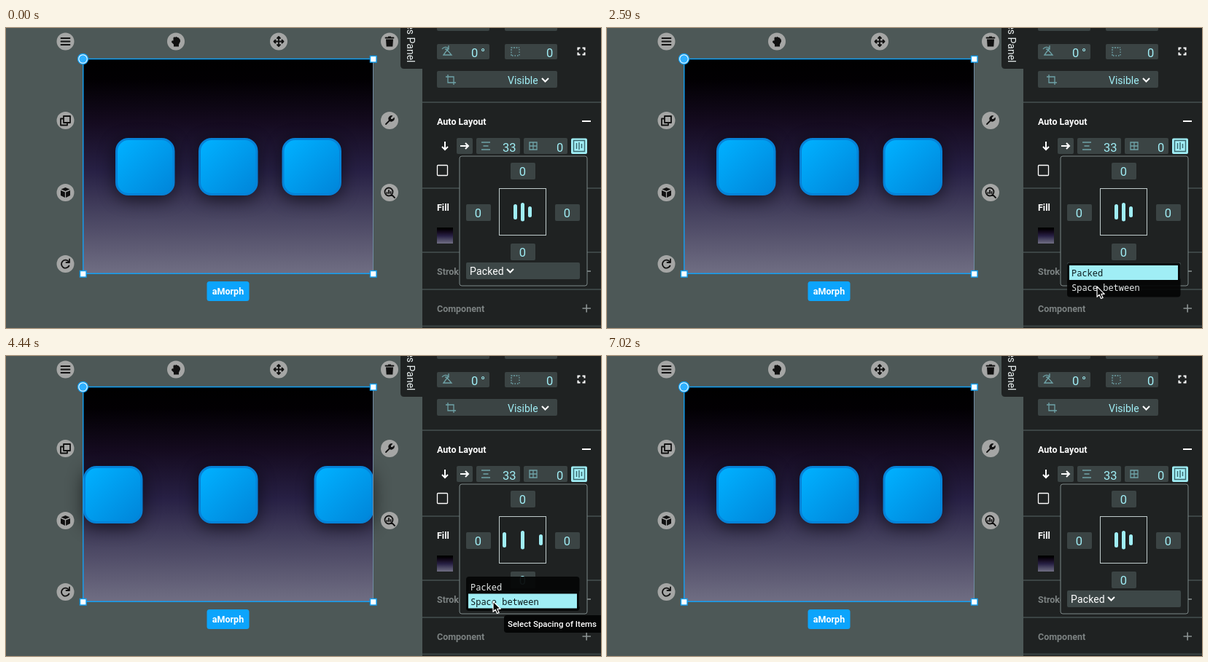
An HTML page that plays this animation: 816x412 px, repeating every 8.15 s.

```html
<!DOCTYPE html>
<html lang="en">
<head>
<meta charset="utf-8">
<title>Auto layout spacing</title>
<style>
  html, body { margin: 0; width: 100%; height: 100%; overflow: hidden; background: #4d5857; }
  svg { display: block; width: 100vw; height: 100vh; font: 14px Roboto, sans-serif; }
  .head { font-size: 12.5px; font-weight: 700; fill: #fff; }
  .dim { fill: #7c8282; }
  .num { font-size: 16.5px; fill: #a0eef5; }
  .mono { font: 12px "Noto Sans Mono", monospace; }
  .line { fill: none; stroke: #fff; stroke-width: 2; }
  .cyan { fill: none; stroke: #6fa3a8; stroke-width: 1.3; }
  .ink { fill: none; stroke: #111; stroke-width: 1.8; stroke-linejoin: round; stroke-linecap: round; }
</style>
</head>
<body>
<svg viewBox="0 0 816 412" preserveAspectRatio="none">
  <defs>
    <linearGradient id="night" x2="0" y2="1">
      <stop offset="0" stop-color="#000"/>
      <stop offset=".1" stop-color="#020003"/>
      <stop offset=".3" stop-color="#150b20"/>
      <stop offset=".52" stop-color="#272044"/>
      <stop offset=".72" stop-color="#46425f"/>
      <stop offset="1" stop-color="#706e83"/>
    </linearGradient>
    <linearGradient id="sky" x2="1" y2="1">
      <stop offset=".05" stop-color="#00b0ff"/>
      <stop offset="1" stop-color="#0084d8"/>
    </linearGradient>
    <filter id="blur" x="-60%" y="-60%" width="220%" height="220%">
      <feGaussianBlur stdDeviation="12"/>
    </filter>
    <g id="tile">
      <rect y="5" width="81" height="79" rx="18" opacity=".6" filter="url(#blur)"/>
      <rect x="1.5" y="1.5" width="78.5" height="76" rx="16.5" fill="url(#sky)" stroke="#0683d8" stroke-width="3"/>
    </g>
    <path id="chevron" class="line" d="M-4.500-2.500L0 2L4.500-2.500" stroke-width="2.4"/>
  </defs>

  <rect width="816" height="412" fill="#4d5857"/>
  <rect x="106" y="43" width="398" height="294" fill="url(#night)"/>
  <use href="#tile" class="tile" y="151"/>
  <use href="#tile" class="tile" y="151"/>
  <use href="#tile" class="tile" y="151"/>
  <path d="M503.500 43V337" stroke="#6f8ca3"/>
  <path d="M503.500 42.500H105.800V337.300H503.500" fill="none" stroke="#12a0f4" stroke-width="1.4"/>
  <g id="handles" fill="#fff" stroke="#12a0f4" stroke-width="1.4">
    <circle cx="105.500" cy="42.500" r="7"/>
    <circle cx="105.500" cy="42.500" r="5.200" fill="#2fb0ff" stroke="none"/>
  </g>
  <rect x="275.500" y="348" width="58" height="27" rx="3.500" fill="#0ca4fc"/>
  <text x="304.500" y="366" text-anchor="middle" class="head">aMorph</text>
  <g id="tools"></g>

  <path d="M541 0H572V56H546Q541 56 541 51Z" fill="#1f2222"/>
  <text transform="translate(550 47.500) rotate(90)" text-anchor="end" fill="#e8eeee">es Panel</text>
  <rect x="571" width="245" height="412" fill="#1f2222"/>
  <path d="M571 102H816M571 220H816M571 308H816M571 359H816M571 409.500H816" stroke="#3b4444" stroke-width="2"/>
  <g id="fields"></g>

  <text x="638" y="40" class="num">0</text><text x="651" y="40" class="num">°</text>
  <text x="741" y="40" class="num">0</text>
  <path class="cyan" d="M598 29A6 6 0 0 1 607 28M607 24V29H602M600 37L605 30L611 37Z"/>
  <path class="cyan" d="M693 38V27H704" stroke-dasharray="2 1.500"/>
  <path class="cyan" d="M704 29V38H694" stroke-dasharray="1.500 2"/>
  <path class="line" d="M784.500 30.500V27.500H787.500M790.500 27.500H793.500V30.500M793.500 33.500V36.500H790.500M787.500 36.500H784.500V33.500"/>
  <path class="cyan" d="M606 64V75H617M603 67H614V78" stroke-width="1.500"/>
  <text x="688" y="76.500" fill="#a0eef5">Visible</text>
  <use href="#chevron" x="739.500" y="71.500" style="--c:1"/>
  <text x="591" y="133" class="head">Auto Layout</text>
  <path class="line" d="M790 128H802"/>
  <path class="line" stroke-width="1.600" d="M602 156V167M598 163L602 167L606 163M623 162H634M630 158L634 162L630 166"/>
  <path class="cyan" d="M652 157H664M654.500 162H661.500M652 167H664M718 157H728V167H718ZM723 157V167M718 162H728"/>
  <text x="681" y="169.500" class="num">33</text><text x="755" y="169.500" class="num">0</text>
  <rect x="775" y="151.500" width="22" height="21.500" rx="2" fill="#a0eef5"/>
  <path d="M778.500 154.500H793.500V169.500H778.500ZM782.500 158V166M786 157V167M789.500 159V165" fill="none" stroke="#39666b" stroke-width="1.400"/>
  <rect x="591.500" y="188.500" width="14" height="14" rx="1" class="line" style="stroke-width:1.300"/>
  <text x="591" y="251" class="head">Fill</text>
  <rect x="591" y="274" width="22" height="22" fill="url(#night)"/>
  <text x="591" y="339" class="head dim">Stroke</text>
  <text x="591" y="390" class="head dim">Component</text>
  <path d="M790.500 334H802M790.500 385H802M796.200 379.500V390.500" stroke="#8b9292" stroke-width="1.600"/>

  <rect x="622" y="176" width="175" height="178" rx="3" fill="#1f2222" stroke="#7d8888"/>
  <g id="paddings"></g>
  <rect x="676.500" y="220.500" width="64" height="64" fill="none" stroke="#c0cccc"/>
  <rect class="bar" y="242" width="5" height="21" rx="2.500" fill="#a0eef5"/>
  <rect class="bar" y="240" width="5" height="25.500" rx="2.500" fill="#a0eef5"/>
  <rect class="bar" y="245" width="5" height="15" rx="2.500" fill="#a0eef5"/>
  <rect x="631" y="322" width="156" height="23" rx="2" fill="#3d4747"/>
  <text id="choice" x="636" y="338.500" fill="#fff" letter-spacing=".15"></text>
  <use id="caret" href="#chevron" y="333.500"/>

  <g id="list">
    <rect x="631" width="155.500" height="47" rx="4" fill="#050606" fill-opacity=".93"/>
    <rect id="mark" x="634" width="149" height="20" fill="#a0eef5"/>
    <text class="mono row" x="637" y="18.500">Packed</text>
    <text class="mono row" x="637" y="38.500">Space between</text>
  </g>
  <g id="tip">
    <rect x="683" y="356" width="140" height="24" rx="4" fill="#050606"/>
    <text x="688" y="372" fill="#fff" font-size="11.500" font-weight="500">Select Spacing of Items</text>
  </g>

  <g id="cursor" stroke-linejoin="round" stroke-linecap="round">
    <path id="arrow" d="M0 0V14.300L3.200 11.300L5.500 16.500L8.100 15.400L5.800 10.300H10.300Z" fill="#0a0a0a" stroke="#fff" stroke-width="1.200"/>
    <g id="hand" fill="#fff" stroke="#111">
      <path d="M-1.800 9V1.800Q-1.500 0 0 0Q1.300 0 1.500 1.800V5.500Q3.500 4.600 4.200 6.300Q6 5.800 6.400 7.300Q8.300 7 8.300 9Q8.300 12 6.500 14V16H-1.500V14.500L-5.500 9.500Q-6.200 7.500-4.300 7.700Z"/>
      <path d="M1.500 11V13.500M3.500 11V13.500M5.500 11V13.500" fill="none" stroke-width=".8"/>
    </g>
    <g id="grab" fill="#fff" stroke="#111">
      <path d="M-4.500 4.500L-6.300-1.500Q-6.300-3.500-4.300-3L-3-1V-4Q-2.500-6-1-4.500V-5Q.2-7 1.500-5V-4Q3.300-5.500 4.200-3.300V0Q5.800-2 6.700 0Q6.500 4 4.800 6V9H-3.500V7L-8 3Q-8 .8-6 1.500Z"/>
      <path d="M-1 0V-3.500M1.500 0V-3.500M4.200 1V-1" fill="none" stroke-width=".7"/>
    </g>
  </g>
</svg>
<script>
const LOOP = 8150;
const $ = id => document.getElementById(id);
const all = sel => [...document.querySelectorAll(sel)];
const box = (x, y, w, h) => `<rect x="${x}" y="${y}" width="${w}" height="${h}" rx="2" fill="#3b4444"/>`;
const show = (el, on) => el.setAttribute('visibility', on ? 'inherit' : 'hidden');
const place = (els, xs) => els.forEach((el, i) => el.setAttribute('x', xs[i]));

$('fields').innerHTML = [
  [591, -18, 72, 22], [684, -18, 72, 22], [591, 22, 72, 21], [684, 22, 72, 21],
  [591, 59, 165, 23], [618, 151, 22, 22], [645, 151, 60, 22], [710, 151, 60, 22]
].map(b => box(...b)).join('');

$('paddings').innerHTML = [[692, 185], [631, 242], [753, 242], [692, 296]].map(([x, y]) =>
  box(x, y, 34, 23) + `<text class="num" x="${x + 16.5}" y="${y + 18}" text-anchor="middle">0</text>`).join('');

$('handles').innerHTML += [[499.5, 38.5], [101.5, 333.5], [499.5, 333.5]].map(([x, y]) =>
  `<rect x="${x}" y="${y}" width="8.500" height="8.500"/>`).join('');

// Round tool buttons: centre, line icon, solid icon
const tools = [
  [81.5, 18.5, 'M-6-4.500H6M-6 0H6M-6 4.500H6', ''],
  [233, 18.5, '', 'M-3.500-5Q-2-7-1-5.500Q.500-7.500 2-5.500Q4-6 4.500-4Q6-3.500 6 0L4 4V7H-3V4L-6 1Q-6-2-3.500-1Z'],
  [374, 18.5, 'M-6 0H6M0-6V6M-4.500-2L-6.500 0L-4.500 2M4.500-2L6.500 0L4.500 2M-2-4.500L0-6.500L2-4.500M-2 4.500L0 6.500L2 4.500', ''],
  [526, 18.5, 'M-5.500-5H5.500', 'M-2-7H2V-5H-2ZM-5-3H5L4.300 7H-4.300Z'],
  [81.5, 127, 'M-2.500-6H6.500V3H-2.500ZM-2.500-2.500H-6.500V6.500H2.500V3', ''],
  [526, 127, 'M-5 5L1-1', 'M-1 0A4.500 4.500 0 0 1 4.500-6.500L2-4V-2H4L6.500-4.500A4.500 4.500 0 0 1 0 1Z'],
  [81.5, 226, '', 'M0-7L6-4.500L0-2L-6-4.500ZM-6.500-3L-.600-.500V7L-6.500 4ZM6.500-3L.600-.500V7L6.500 4Z'],
  [526, 226, 'M-6.500-1A5.500 5.500 0 1 1 4.500-1A5.500 5.500 0 1 1-6.500-1M3 3L7 7M-3.500 0V1M-1-3V1M1.500-1V1', ''],
  [81.5, 324, 'M5 2.500A5.500 5.500 0 1 1 4.500-3M5.500-6.500V-2H1', '']
];
$('tools').innerHTML = tools.map(([x, y, line, solid]) =>
  `<g transform="translate(${x} ${y})"><circle r="12" fill="#a5a6a5"/><path class="ink" d="${line}"/><path fill="#111" d="${solid}"/></g>`).join('');
document.querySelector('[style="--c:1"]').setAttribute('filter', '');

// Pointer moves: start, end, steps, target x, target y, shape
const moves = [
  [590, 940, 7, 675, 345, 'arrow'],
  [1000, 1120, 3, 676, 339, 'arrow'],
  [1300, 1360, 2, 676, 336, 'arrow'],
  [1720, 1720, 1, 678, 336, 'hand'],
  [2130, 2130, 1, 677, 336, 'arrow'],
  [2420, 2590, 4, 672, 355, 'arrow'],
  [3420, 3600, 4, 669, 338, 'arrow'],
  [3780, 3780, 1, 669, 339, 'hand'],
  [4320, 4320, 1, 668, 337, 'arrow'],
  [4790, 5070, 6, 652, 318, 'arrow'],
  [5310, 5310, 1, 652, 319, 'grab'],
  [5660, 5900, 5, 651, 341, 'hand'],
  [6610, 7020, 7, 668, 415, 'arrow']
];

function pointerAt(t) {
  let x = 683, y = 412, shape = 'arrow';
  for (const [start, end, steps, tx, ty, kind] of moves) {
    if (t < start) break;
    const pace = (end - start) / (steps - 1) || 1;
    const k = Math.min(1, (1 + Math.floor((t - start) / pace + 1e-6)) / steps);
    x += (tx - x) * k;
    y += (ty - y) * k;
    shape = kind;
  }
  return { x, y, shape };
}

const tiles = all('.tile'), bars = all('.bar'), rows = all('.row');

function draw(t) {
  const within = (a, b) => t >= a && t < b;
  const spread = within(3000, 5310);
  place(tiles, spread ? [106, 264, 422.5] : [150, 264, 378.5]);
  place(bars, spread ? [681, 706, 731] : [696, 706, 716]);
  $('choice').textContent = spread ? 'Space between' : 'Packed';
  $('caret').setAttribute('x', spread ? 742.5 : 691.5);

  show($('list'), within(2010, 3000) || within(4260, 5310));
  $('list').setAttribute('transform', `translate(0 ${spread ? 303 : 322.5})`);
  $('mark').setAttribute('y', spread ? 23.5 : 3.5);
  rows.forEach((row, i) => row.setAttribute('fill', i === +spread ? '#0b1a1c' : '#e6eaea'));
  show($('tip'), within(4440, 4790));

  const p = pointerAt(t);
  show($('cursor'), within(590, 7020));
  $('cursor').setAttribute('transform', `translate(${p.x} ${p.y})`);
  for (const id of ['arrow', 'hand', 'grab']) show($(id), id === p.shape);
}

const begin = performance.now();
function tick() {
  draw((performance.now() - begin) % LOOP);
  requestAnimationFrame(tick);
}
tick();
</script>
</body>
</html>
```
